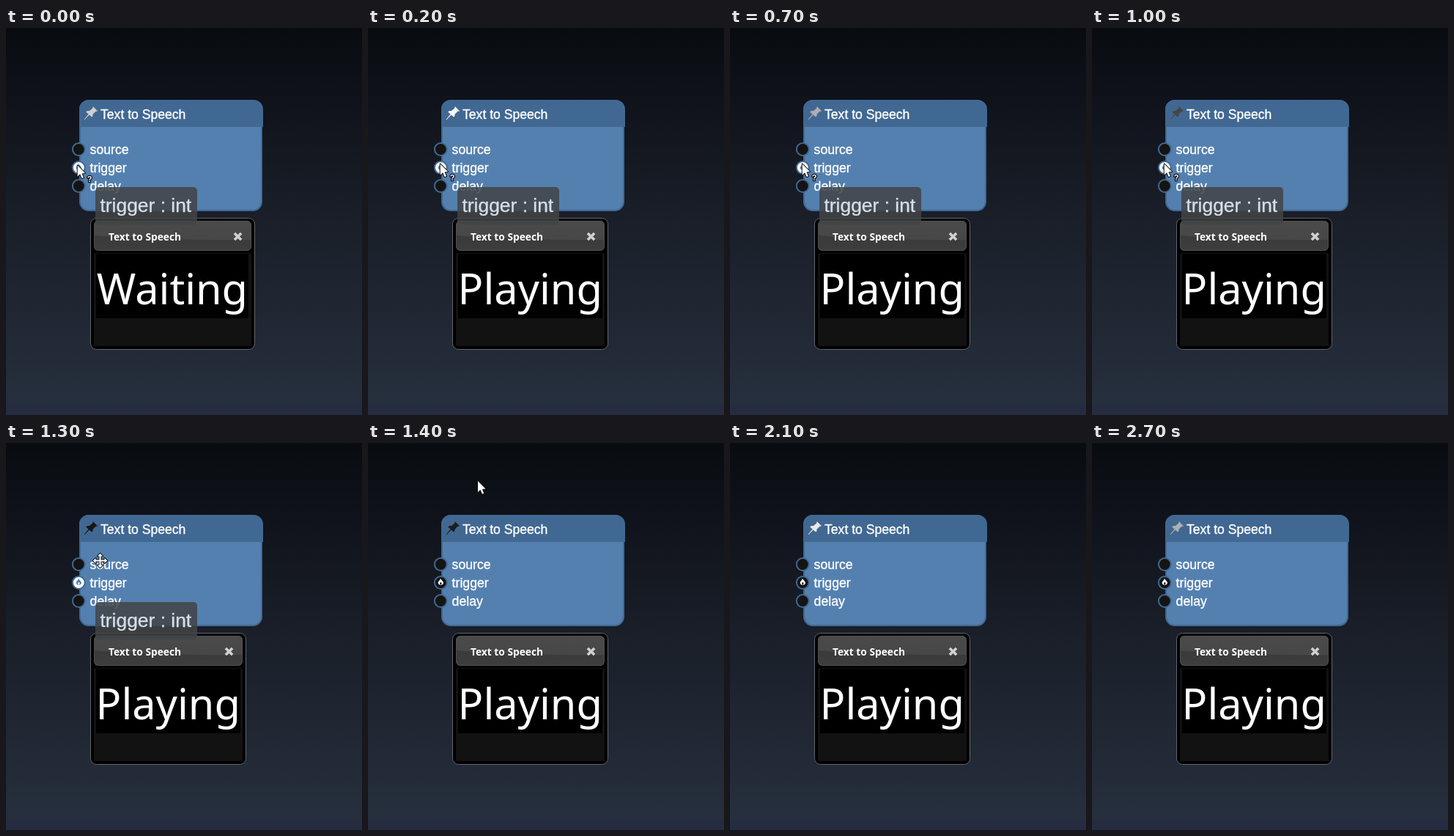
An HTML page with a canvas for the animation above (2800 ms loop, 486 by 528 pixels).

```html
<!DOCTYPE html>
<html lang="en">
<head>
<meta charset="utf-8">
<title>Text to Speech node</title>
<style>
html, body { margin: 0; width: 100%; height: 100%; overflow: hidden; background: #10131b; }
canvas { display: block; }
</style>
</head>
<body>
<canvas id="stage" width="486" height="528"></canvas>
<script>
const ctx = document.getElementById('stage').getContext('2d');
const LOOP = 2800, STEP = 100;
const ARIAL = '"Liberation Sans", Arial, sans-serif';
const HUMANIST = '"Noto Sans", "Open Sans", sans-serif';
const EDGE = '#416892';

function gradient(y0, y1, stops) {
  const g = ctx.createLinearGradient(0, y0, 0, y1);
  for (const [at, color] of stops) g.addColorStop(at, color);
  return g;
}

function box(x, y, w, h, r, fill, stroke, lineWidth = 1) {
  ctx.beginPath();
  ctx.roundRect(x, y, w, h, r);
  if (fill) { ctx.fillStyle = fill; ctx.fill(); }
  if (stroke) { ctx.strokeStyle = stroke; ctx.lineWidth = lineWidth; ctx.stroke(); }
}

function text(str, x, y, font, color = '#fff', weight = 0) {
  ctx.font = font;
  ctx.fillStyle = ctx.strokeStyle = color;
  ctx.fillText(str, x, y);
  if (weight) {
    ctx.lineWidth = weight;
    ctx.strokeText(str, x, y);
  }
}

function polygon(points) {
  ctx.beginPath();
  points.forEach(([x, y]) => ctx.lineTo(x, y));
  ctx.closePath();
}

function drawBackground() {
  ctx.fillStyle = gradient(0, 528, [
    [0, '#080b0f'], [0.2, '#10131b'], [0.5, '#1a1f29'], [0.97, '#262f3d'], [0.985, '#252b40'], [1, '#252b40']
  ]);
  ctx.fillRect(0, 0, 486, 528);
}

function drawPin(t) {
  const glow = 0.5 + 0.5 * Math.cos((t - 300) / 1000 * Math.PI);
  const v = Math.round(22 + 233 * glow);
  polygon([
    [118.8, 107], [125.2, 113.4], [122.6, 113.8], [118.6, 117.4], [118.4, 120], [117.2, 121.4],
    [113.6, 118.4], [107.2, 125.2], [106.7, 124.7], [112.6, 117.4], [109.2, 114.4],
    [110.6, 113.2], [114, 113], [118.2, 109.4]
  ]);
  ctx.fillStyle = `rgb(${v},${v},${v})`;
  ctx.fill();
}

function drawFlame(x, y, color, hole) {
  ctx.beginPath();
  ctx.moveTo(x - 0.4, y - 5);
  ctx.bezierCurveTo(x + 0.5, y - 2.2, x + 3.7, y - 1.2, x + 3.6, y + 1.4);
  ctx.bezierCurveTo(x + 3.5, y + 5, x - 3.6, y + 5, x - 3.6, y + 1.2);
  ctx.bezierCurveTo(x - 3.6, y - 1.2, x - 0.6, y - 2, x - 0.4, y - 5);
  ctx.fillStyle = color;
  ctx.fill();
  ctx.beginPath();
  ctx.ellipse(x, y + 1.9, 1.2, 1.5, 0, 0, Math.PI * 2);
  ctx.fillStyle = hole;
  ctx.fill();
}

function drawPort(y, label, fill = '#141414') {
  ctx.beginPath();
  ctx.arc(99.3, y, 8.4, 0, Math.PI * 2);
  ctx.fillStyle = fill;
  ctx.fill();
  ctx.strokeStyle = EDGE;
  ctx.lineWidth = 2;
  ctx.stroke();
  text(label, 114.6, y + 6.5, `17.7px ${ARIAL}`, '#fff', 0.35);
}

function drawNode(t, hovered) {
  box(101, 99, 248, 150, 12, '#5480b0', EDGE, 2);
  box(100, 98, 251, 37, [13, 13, 0, 0], EDGE);
  drawPin(t);
  text('Text to Speech', 129, 124, `17.6px ${ARIAL}`, '#fff', 0.35);
  const portFill = hovered ? '#fff' : '#141414';
  drawPort(165.5, 'source');
  drawPort(190.5, 'trigger', portFill);
  drawFlame(99.3, 189.5, hovered ? '#5480b0' : '#fff', portFill);
  drawPort(215.5, 'delay');
}

function drawCross(x, y) {
  ctx.strokeStyle = '#d0d0d0';
  ctx.lineWidth = 3.6;
  ctx.beginPath();
  for (const s of [-1, 1]) {
    ctx.moveTo(x - 4.6, y - 4.6 * s);
    ctx.lineTo(x + 4.6, y + 4.6 * s);
  }
  ctx.stroke();
}

function drawPanel(playing) {
  const right = playing ? 328 : 340;
  const headWidth = right - 125;
  const inner = right - (playing ? 8 : 9);
  box(115.5, 259.5, right - 116, 179, 8, '#000', '#62656a');

  ctx.save();
  box(120, 263, headWidth, 41, 6, gradient(263, 304, [[0, '#383838'], [1, '#3d3d3d']]));
  ctx.clip();
  ctx.beginPath();
  ctx.moveTo(120, 263);
  ctx.lineTo(120, 283);
  ctx.quadraticCurveTo(210, 290, right, 289);
  ctx.lineTo(right, 263);
  ctx.fillStyle = gradient(263, 290, [[0, '#4a4a4a'], [1, '#474747']]);
  ctx.fill();
  ctx.restore();
  box(120.5, 263.5, headWidth - 1, 40, 6, null, '#505050');

  text('Text to Speech', 140, 290, `bold 13.75px ${HUMANIST}`);
  drawCross(right - 23.5, 284.5);

  box(120, 307, right - 125, 127, 2, '#121212');
  ctx.fillStyle = '#000';
  ctx.fillRect(123, 308, inner - 123, 88);
  text(playing ? 'Playing' : 'Waiting', playing ? 122.6 : 123.8, 377, `57.6px ${HUMANIST}`);
}

function drawTooltip() {
  box(122, 217, 139, 51.5, 5, 'rgba(66,68,70,0.86)');
  text('trigger : int', 128.5, 251, `26.4px ${ARIAL}`, '#d6dfe8', 0.35);
}

function outlined() {
  ctx.lineJoin = 'round';
  ctx.strokeStyle = '#111';
  ctx.lineWidth = 2;
  ctx.stroke();
  ctx.fillStyle = '#fff';
  ctx.fill();
}

function drawArrow(x, y, withHelp) {
  ctx.save();
  ctx.translate(x, y);
  polygon([[0, 0], [0, 15], [3.4, 11.8], [5.9, 17.6], [8.2, 16.7], [5.8, 11], [10.4, 10.6]]);
  outlined();
  if (withHelp) {
    ctx.font = `bold 11px ${ARIAL}`;
    ctx.strokeStyle = '#111';
    ctx.lineWidth = 2.5;
    ctx.strokeText('?', 13, 22.5);
    ctx.fillText('?', 13, 22.5);
  }
  ctx.restore();
}

function drawMoveCursor(x, y) {
  const arm = [[1, -1], [1, -6], [3.6, -6], [0, -9.8], [-3.6, -6], [-1, -6], [-1, -1]];
  const points = [];
  for (const [c, s] of [[1, 0], [0, -1], [-1, 0], [0, 1]]) {
    for (const [px, py] of arm) points.push([x + px * c - py * s, y + px * s + py * c]);
  }
  polygon(points);
  outlined();
}

function drawCursor(t) {
  if (t < 100) drawArrow(97.7, 187.5, true);
  else if (t < 1300) drawArrow(98.7, 185.5, true);
  else if (t < 1400) drawMoveCursor(128.5, 160.5);
  else if (t < 1500) drawArrow(150, 52, false);
}

function frame(now) {
  const t = Math.floor((now % LOOP) / STEP) * STEP;
  const hovered = t < 1400;
  drawBackground();
  drawNode(t, hovered);
  drawPanel(t >= 200);
  if (hovered) drawTooltip();
  drawCursor(t);
}

const start = performance.now();
function tick() {
  frame(performance.now() - start);
  requestAnimationFrame(tick);
}
tick();
</script>
</body>
</html>
```
